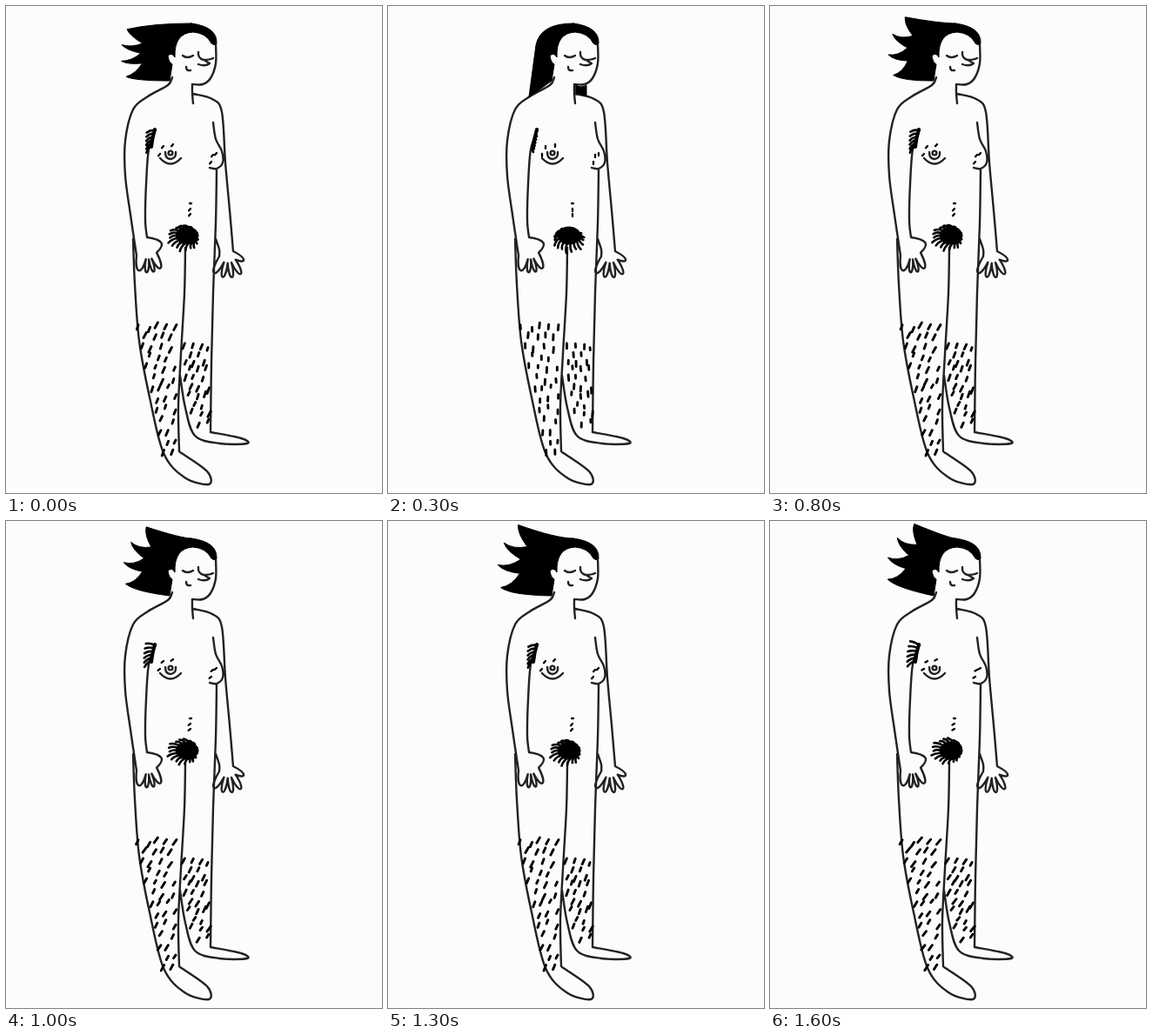
An HTML page that plays this animation: 432 by 560 pixels, repeating every 1700 ms.

```html
<!DOCTYPE html>
<html lang="en">
<head>
<meta charset="utf-8">
<title>Breeze</title>
<style>
  html, body { margin: 0; width: 100%; height: 100%; overflow: hidden; background: #fcfcfc; }
  svg { display: block; width: 432px; height: 560px; }
  path, circle { stroke-linecap: round; stroke-linejoin: round; }
  .line { fill: none; stroke: #222; stroke-width: 2.4; }
  .tuft { fill: none; stroke: #000; stroke-width: 2.6; }
  .ink { fill: #000; stroke: #000; stroke-width: 1; }
</style>
</head>
<body>
<svg viewBox="0 0 432 560">
  <g class="line">
    <path id="body"/>
    <!-- eyes, nose, mouth -->
    <path d="M203 57Q208 61 215 57M221 53Q220 60 227 62Q234 62 238 60M229 63L234 66Q229 70 221 67M207 70Q207 75 212 74"/>
    <path d="M177 175Q189 188 201 175M183 168Q183 176 189 176Q196 175 195 168"/>
    <circle cx="189" cy="169" r="2.4"/>
  </g>
  <path id="nape" class="ink" d="M216 91Q222 95 228 91V103Q222 103 216 100Z"/>
  <path id="hair" class="ink"/>
  <path class="tuft" style="stroke-width:4" d="M171 142Q168 152 167 162"/>
  <ellipse class="ink" cx="208" cy="264" rx="13" ry="10"/>
  <path id="tufts" class="tuft"/>
  <path id="marks" class="tuft" style="stroke-width:2.3"/>
  <path id="legs" class="tuft" style="stroke-width:2.9"/>
</svg>
<script>
const STEP = 100;
const set = (id, d) => document.getElementById(id).setAttribute('d', d);
const mix = (a, b, t) => a + (b - a) * t;
const rad = deg => deg * Math.PI / 180;
const polar = (x, y, deg, r) => [x + Math.cos(rad(deg)) * r, y + Math.sin(rad(deg)) * r];

// smooth curve through a few points
function curve(text) {
  const n = text.split(' ').map(Number), p = [];
  for (let i = 0; i < n.length; i += 2) p.push([n[i], n[i + 1]]);
  const at = i => p[Math.max(0, Math.min(p.length - 1, i))];
  let d = 'M' + p[0];
  for (let i = 0; i < p.length - 1; i++) {
    const [a, b, c, e] = [at(i - 1), at(i), at(i + 1), at(i + 2)];
    d += `C${b.map((v, k) => v + (c[k] - a[k]) / 6)} ${c.map((v, k) => v - (e[k] - b[k]) / 6)} ${c}`;
  }
  return d;
}

// thumb, then four fingers spread evenly between two angles
function hand(start, end, [x, y], thumb, from, to, len) {
  const angles = [thumb, ...[0, 1, 2, 3].map(i => mix(from, to, i / 3))];
  return 'M' + start + angles.map((a, i) => {
    const r = (i ? len : len * .7) * 1.18;
    const next = i < 4 ? polar(x, y, (a + angles[i + 1]) / 2, len * .4) : end;
    return `C${polar(x, y, a - 8, r)} ${polar(x, y, a + 8, r)} ${next}`;
  }).join('');
}

set('body', [
  '241 43 241 66 235 83 226 90 214 90',
  '214 90 214 100 215 112',
  '191 82 186 91 163 104 146 119 137 155 137 195 143 240 150 287',
  '172 142 164 165 161 205 160 246 162 266',
  '215 101 237 107 248 122 252 180 257 235 261 282',
  '241 268 245 280 245 288',
  '238 134 241 153 248 167 249 180 242 187 234 186',
  '242 188 241 250 238 330 236 410 235 490',
  '146 268 148 320 153 385 165 450 181 514 205 542 233 550 231 535 200 513',
  '206 278 205 330 201 400 198 460 199 512',
  '200 425 206 462 217 494 245 503 277 503 270 497 235 490'
].map(curve).join('')
  + hand([162, 266], [150, 287], [163, 281], -27, 56, 112, 26)
  + hand([261, 282], [245, 288], [255, 284], 24, 59, 124, 29));

// blow: hanging to flying; tilt: lean of short hair; lift, fan: angles of the locks
const pose = (blow, tilt, lift, fan, len) => ({ blow, tilt, lift, fan, len });
const blend = (a, b, t) =>
  Object.fromEntries(Object.keys(a).map(k => [k, mix(a[k], b[k], t)]));

const still = pose(0, 0, 4, 15, 56);
const rise = pose(1, .2, 4, 15, 56);
const swept = pose(1, .65, 28, 18, 60);
const flow = pose(1, .7, 49, 25, 56);
const gust = pose(1, 1, 63, 25, 58);
const stream = pose(1, .7, 50, 23, 66);

const steps = [
  swept, rise, blend(rise, still, .6), still, still, still,
  rise, blend(rise, flow, .5), flow, swept, blend(flow, gust, .6),
  gust, swept, stream, flow, swept, gust
];

// four locks fan out behind the head, each hooked slightly upward
function hairPath({ blow, lift, fan, len }) {
  const at = (u, r) => {
    const v = Math.min(u, 3);
    const [x, y] = polar(192, 55, 180 + lift - fan * u, len * r);
    return [mix(170 - 2.7 * v, x, blow), mix(45 + 20 * v, y, blow)];
  };
  const [x, y] = at(-1.8, .8);
  let d = `M213 20Q${x} ${Math.max(20, y)} ${at(0, 1)}`;
  for (let i = 0; i < 3; i++) {
    d += `Q${at(i + .3, .9)} ${at(i + .5, .62)}Q${at(i + 1.1, .8)} ${at(i + 1, 1)}`;
  }
  return d + `Q${at(3.5, .9)} 188 86L191 67Q187 65 186 57Q191 53 194 59` +
    'Q193 31 215 30Q230 31 236 43Q239 46 242 43Q243 24 213 20Z';
}

function random(seed) {
  return () => (seed = (seed * 16807) % 2147483647) / 2147483647;
}

// 0 degrees hangs down, larger angles turn left
function strand(x, y, deg, len, bend = 0) {
  const mid = polar(...polar(x, y, 90 + deg, len / 2), 180 + deg, bend);
  return `M${x} ${y}Q${mid} ${polar(x, y, 90 + deg, len)}`;
}

function tuftPath(tilt) {
  let d = '';
  for (let i = 0; i < 6; i++) {
    const t = i / 5;
    d += strand(mix(171, 167, t), mix(143, 161, t), tilt * mix(115, 55, t), 7 + tilt * 4, 2);
  }
  const [wx, wy] = polar(0, 0, 90 + tilt * 85, .9);
  for (let i = 0; i < 18; i++) {
    const [cx, cy] = polar(0, 0, i * 20, 1);
    const vx = cx * .8 + wx, vy = cy * .8 + wy;
    const deg = Math.atan2(-vx, vy) * 180 / Math.PI;
    d += strand(208 + cx * 12, 264 + cy * 9, deg, 3 + Math.hypot(vx, vy) * (3 + i % 3), 2);
  }
  return d;
}

function markPath(tilt) {
  const spots = [[181, 161], [192, 159], [177, 170], [238, 171], [242, 169], [236, 179], [212, 233], [212, 239]];
  return 'M211 227H213' + spots.map(([x, y]) => strand(x, y, tilt * 60, 3)).join('');
}

const rnd = random(73);
const legHair = [];
function growHair(top, bottom, gap, left, right) {
  for (let y = top, row = 0; y < bottom; y += gap, row++) {
    for (let x = left(y) + (row % 2) * 5; x <= right; x += 10) {
      legHair.push({
        x: x + (rnd() - .5) * 4, y: y + (rnd() - .5) * 7,
        turn: (rnd() - .5) * 12, len: 3 + rnd() * 3.5
      });
    }
  }
}
growHair(366, 511, 12, y => 154 + (y - 366) * .2, 196);
growHair(386, 484, 10, y => 207 + Math.max(0, y - 430) * .2, 235);

function draw(p) {
  set('hair', hairPath(p));
  set('tufts', tuftPath(p.tilt));
  set('marks', markPath(p.tilt));
  set('legs', legHair.map(h =>
    strand(h.x, h.y, p.tilt * 34 + h.turn, h.len + p.tilt)).join(''));
  document.getElementById('nape').style.display = p.blow ? 'none' : '';
}

let shown = -1;
function tick() {
  const i = Math.floor(performance.now() / STEP) % steps.length;
  if (i !== shown) draw(steps[shown = i]);
  requestAnimationFrame(tick);
}
tick();
</script>
</body>
</html>
```
